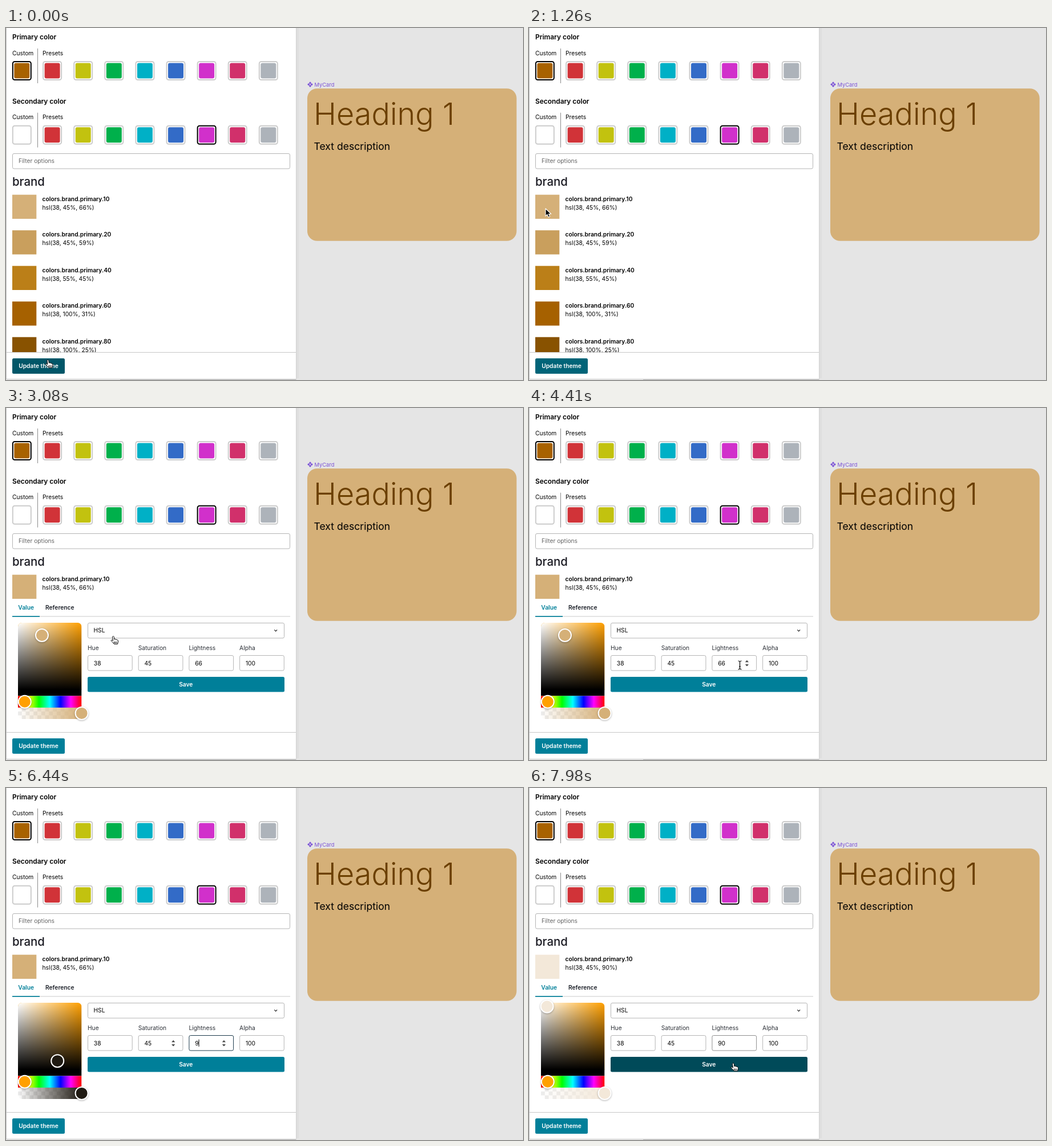
An HTML page that plays this animation: 906x618 px, repeating every 8000 ms.

```html
<!DOCTYPE html>
<html lang="en">
<head>
<meta charset="utf-8">
<title>Theme editor</title>
<style>
  html, body { margin: 0; width: 100%; height: 100%; overflow: hidden; background: #e5e5e5; }
  svg { display: block; font: 400 10.25px Inter, sans-serif; }
  text { white-space: pre; }
  .bold { font-weight: 600; }
  .title { font-weight: 600; font-size: 11.9px; }
  .knob { stroke: #fff; stroke-width: 2; filter: drop-shadow(0 1.5px 1.5px rgba(0, 0, 0, .3)); }
</style>
</head>
<body>
<svg id="stage" width="906" height="618" viewBox="0 0 906 618">
  <defs>
    <linearGradient id="white"><stop stop-color="#fff"/><stop offset="1" stop-color="#fff" stop-opacity="0"/></linearGradient>
    <linearGradient id="black" x2="0" y2="1"><stop stop-opacity="0"/><stop offset="1"/></linearGradient>
    <linearGradient id="hues">
      <stop stop-color="#f00"/><stop offset=".17" stop-color="#ff0"/><stop offset=".33" stop-color="#0f0"/>
      <stop offset=".5" stop-color="#0ff"/><stop offset=".67" stop-color="#00f"/><stop offset=".83" stop-color="#f0f"/>
      <stop offset="1" stop-color="#f00"/>
    </linearGradient>
    <linearGradient id="fade"><stop class="tint" stop-opacity="0"/><stop class="tint" offset="1"/></linearGradient>
    <pattern id="checker" x="21" y="526" width="13.6" height="13.6" patternUnits="userSpaceOnUse">
      <path d="M6.8 0h6.8v6.8h-13.6v6.8h6.8z" fill="#ececec"/>
    </pattern>
    <clipPath id="listArea"><rect y="250" width="508" height="319"/></clipPath>
    <clipPath id="pickerArea"><rect x="21" y="377" width="111.5" height="169" rx="6.8"/></clipPath>
  </defs>
  <g id="base"></g>
  <g id="list" clip-path="url(#listArea)"></g>
  <g id="editor"></g>
  <g id="arrow"><path d="M0 0v13.2l3-2.8 2 4.7 2.5-1-2-4.6h4.2z" stroke="#fff" stroke-width="1.1" stroke-linejoin="round"/></g>
  <g id="hand"><path d="M-1 1.2c0-2 2.5-2 2.8 0l.5 4 1-.6 1.3.5 1 .2 1.1.6c1.9-.2 2.4 1.5 2.3 3.2l-1 4.3h-6.1l-2.7-3.2-2.2-2.1c-1-1.4.7-2.5 1.9-1.2l1 .9zM4 9.2v3M6.2 9.2v3M2 9.2v3" fill="#fff" stroke="#000" stroke-linejoin="round"/></g>
  <g id="beam"><path d="M-3-7.5q2.4 0 3 1.4q.6-1.4 3-1.4M-3 7.5q2.4 0 3-1.4q.6 1.4 3 1.4M0-6v12M-1.5 2.5h3" fill="none" stroke="#000" stroke-width="1.2"/></g>
</svg>
<script>
const LOOP = 8000, STEP = 70;
const TEAL = [0, 127, 153], HOVER = [0, 86, 104], ACTIVE = [0, 74, 89];
const SAND = '#d5b078';
const $ = id => document.getElementById(id);
const rgb = c => `rgb(${c.map(Math.round)})`;
const clamp = v => Math.max(0, Math.min(1, v));
const mix = (a, b, k) => a.map((v, i) => v + (b[i] - v) * k);

const text = (x, y, s, attrs = '') => `<text x="${x}" y="${y}" ${attrs}>${s}</text>`;
const rect = (x, y, w, h, fill, attrs = '') =>
  `<rect x="${x}" y="${y}" width="${w}" height="${h}" fill="${fill}" ${attrs}/>`;
const field = (x, y, w, attrs = '') => rect(x, y, w, 26.5, '#fff', `rx="2.5" stroke="#b5b5b5" ${attrs}`);
const knob = (x, y, attrs) => `<circle class="knob" cx="${x}" cy="${y}" r="11" ${attrs}/>`;

function paletteRow(title, y, custom, selected) {
  const presets = ['#d13338', '#c2c20f', '#00b04b', '#00b0c6', '#336bc7', '#d130cb', '#d1306b', '#adb3ba'];
  const cells = [custom, ...presets].map((color, i) => {
    const x = i ? 27 + 54.1 * i : 27.8, on = i === selected;
    return rect(x - 16, y - 16, 32, 32, '#fff', `rx="3.5" stroke="${on ? '#000' : '#ccc'}" stroke-width="2"`) +
      rect(x - 13.5, y - 13.5, 27, 27, color, 'rx="3"');
  });
  return text(11, y - 55.2, title, 'class="title"') + text(11, y - 27.4, 'Custom') + text(64, y - 27.4, 'Presets') +
    rect(55, y - 39, 1, 61, '#8a8a8a') + cells.join('');
}

function token(i, name, value, color, ids = ['', '']) {
  const y = 292.7 + 62.5 * i;
  return rect(11, y, 42.3, 42.3, color, ids[0]) + text(63.5, y + 11, 'colors.brand.primary.' + name, 'class="bold"') +
    text(63.5, y + 26.2, `hsl(38, ${value})`, ids[1]);
}

const diamond = (x, y) => `<path d="M${x} ${y - 2.2}l2.2 2.2-2.2 2.2-2.2-2.2z" fill="#7b52d6"/>`;

$('base').innerHTML =
  rect(508, 0, 5, 615, '#dedede') + rect(0, 0, 508.5, 618, '#c4c4c4') + rect(1, 0, 507, 616, '#fff') +
  rect(0, 617, 200, 1, '#f4f4f4') +
  paletteRow('Primary color', 75, '#a86200', 0) + paletteRow('Secondary color', 187.7, '#fff', 6) +
  field(11.5, 220.5, 486) + text(22, 237.2, 'Filter options', 'fill="#666"') +
  text(11, 277, 'brand', 'font-size="20.4" font-weight="500" fill="#1a1a22"') +
  rect(1, 569, 507, 1, '#c8c8c8') + rect(11, 580, 92, 27, '#000', 'id="update" rx="2.5"') +
  text(57, 597, 'Update theme', 'class="bold" fill="#fff" text-anchor="middle"') +
  diamond(533, 96.4) + diamond(533, 101.8) + diamond(530.3, 99.1) + diamond(535.7, 99.1) +
  text(540.5, 102.6, 'MyCard', 'font-size="9.35" fill="#7b52d6"') +
  rect(528, 106.3, 366.7, 267.4, SAND, 'rx="17"') +
  text(539, 170, 'Heading 1', 'font-size="54" font-weight="300" fill="#6b3f00"') +
  text(539.5, 214.4, 'Text description', 'font-size="17.6"');

$('list').innerHTML = [
  ['10', '45%, 66%', SAND], ['20', '45%, 59%', '#c99f5d'], ['40', '55%, 45%', '#bb7f18'],
  ['60', '100%, 31%', '#a66100'], ['80', '100%, 25%', '#885200']
].map((row, i) => token(i, ...row)).join('');

const inputs = [['Hue', 38], ['Saturation', 45], ['Lightness', 66], ['Alpha', 100]].map(([label, value], i) => {
  const x = 143 + 88.7 * i;
  return text(x, 425.2, label, 'fill="#2b2f36"') + field(x + .5, 434.5, 77.7, `id="input${i}"`) +
    (i === 2 ? rect(331, 440, 13.5, 16, '#b3d7fe', 'id="selection"') : '') +
    text(x + 10.8, 451.5, value, `id="value${i}"`) +
    `<path id="spin${i}" d="M${x + 58.4} 446.3l3.1-3.5 3.1 3.5zm0 3.8l3.1 3.5 3.1-3.5z" fill="#444"/>`;
}).join('');

$('editor').innerHTML =
  token(0, '10', '45%, 66%', SAND, ['id="swatch"', 'id="swatchText"']) +
  text(21.3, 353.5, 'Value', `class="bold" fill="${rgb(TEAL)}"`) + text(69, 353.5, 'Reference', 'class="bold" fill="#1d2129"') +
  rect(11, 365, 487, 1.7, '#e0e0e0') + rect(11, 365, 48, 1.7, rgb(TEAL)) +
  '<g clip-path="url(#pickerArea)">' +
    ['#ffa000', 'url(#white)', 'url(#black)'].map(f => rect(21, 377, 111.5, 117.5, f)).join('') +
    rect(21, 494, 111.5, 11.5, '#000') + rect(21, 505.5, 111.5, 20.5, 'url(#hues)') +
    rect(21, 526, 111.5, 20, 'url(#checker)') + rect(21, 526, 111.5, 20, 'url(#fade)') +
  '</g>' +
  knob(0, 0, 'id="pick" class="tint"') + knob(32.8, 515.8, 'fill="#ffa000"') + knob(132.6, 535.9, 'id="alpha"') +
  field(143.5, 377.5, 344) + text(153.5, 394.2, 'HSL') +
  '<path d="M470.3 389.4l2.4 2.4 2.4-2.4" fill="none" stroke="#222" stroke-width="1.2"/>' +
  inputs + rect(338, 441.5, 1, 12.5, '#000', 'id="caret"') +
  rect(143, 472, 345, 26.5, '#000', 'id="save" rx="2.5"') +
  text(315.3, 488.7, 'Save', 'class="bold" fill="#fff" text-anchor="middle"');

// Pointer path: time, x, y, shape used from that time on
const path = [
  [0, 73, 583, 'hand'], [70, 88, 578, 'hand'], [140, 130, 560, 'arrow'], [280, 225, 490, 'arrow'], [420, 226, 420, 'arrow'],
  [630, 110, 332, 'arrow'], [840, 40, 309, 'arrow'], [1050, 29, 317, 'arrow'], [1610, 29, 317, 'arrow'],
  [2030, 87, 438, 'arrow'], [2240, 138, 496, 'arrow'], [2380, 172, 468, 'arrow'], [2450, 185, 449, 'beam'],
  [2590, 186, 436, 'arrow'], [2660, 187, 403, 'hand'], [2870, 190, 390, 'hand'], [3080, 187.5, 401, 'hand'],
  [3150, 186, 418, 'arrow'], [3220, 182, 440, 'beam'], [3290, 180, 450, 'beam'], [3500, 180, 450, 'beam'],
  [3710, 266, 450, 'beam'], [3850, 266, 450, 'beam'], [4410, 369.5, 451.5, 'beam'], [4690, 347, 454, 'beam'],
  [4760, 346, 452, 'beam'], [4970, 298, 450, 'beam'], [6440, 298, 450, ''], [7070, 298, 450, 'beam'],
  [7210, 312, 461, 'arrow'], [7280, 320, 473, 'hand'], [7630, 350, 485, 'hand'], [7840, 357.5, 483.5, 'hand'], [8000, 357.5, 483.5, 'hand']
];

function pointerAt(t) {
  const i = path.findIndex((p, n) => t < path[n + 1][0]);
  const [t0, x0, y0, shape] = path[i], [t1, x1, y1] = path[i + 1];
  const [x, y] = mix([x0, y0], [x1, y1], (t - t0) / (t1 - t0));
  return { x, y, shape };
}

const show = (id, on) => $(id).setAttribute('display', on ? 'inline' : 'none');
const fill = (id, color) => $(id).setAttribute('fill', color);

function render(t) {
  const pointer = pointerAt(t);
  for (const id of ['arrow', 'hand', 'beam']) {
    show(id, pointer.shape === id);
    $(id).setAttribute('transform', `translate(${pointer.x} ${pointer.y})`);
  }

  const open = t >= 1330, focused = t >= 4760 && t < 7910, saved = t >= 7980;
  show('list', !open);
  show('editor', open);
  fill('update', rgb(mix(HOVER, TEAL, clamp((t - 1190) / 210))));
  fill('save', rgb(t >= 7910 ? ACTIVE : mix(TEAL, HOVER, clamp((t - 7210) / 210))));

  const light = t < 6440 ? 66 : t < 6510 ? 9 : 90;
  const color = { 66: SAND, 9: '#1f1a12', 90: '#f3e8d9' }[light];
  const l = light / 100, v = l + .45 * Math.min(l, 1 - l), s = 2 * (1 - l / v);
  $('pick').setAttribute('cx', 21 + 111.5 * s);
  $('pick').setAttribute('cy', 377 + 117.5 * (1 - v));
  fill('pick', color);
  fill('alpha', color);
  document.querySelectorAll('stop.tint').forEach(stop => stop.setAttribute('stop-color', color));
  $('value2').textContent = light;
  fill('swatch', saved ? color : SAND);
  $('swatchText').textContent = `hsl(38, 45%, ${saved ? light : 66}%)`;

  for (let i = 0; i < 4; i++) {
    const dx = pointer.x - (143 + 88.7 * i);
    const hovered = dx > 0 && dx < 78.7 && pointer.y > 434 && pointer.y < 462;
    show('spin' + i, hovered || i === 2 && focused);
  }
  $('input2').setAttribute('stroke', focused ? '#1c3a4a' : t >= 7910 ? '#8f8f8f' : '#b5b5b5');
  show('selection', t >= 4830 && t < 6440);
  show('caret', light !== 66 && focused);
  $('caret').setAttribute('x', light === 9 ? 337.5 : 344);
}

function tick(now) {
  const t = now % LOOP;
  render(Math.floor(t / STEP) * STEP);
  requestAnimationFrame(tick);
}
requestAnimationFrame(tick);
</script>
</body>
</html>
```
